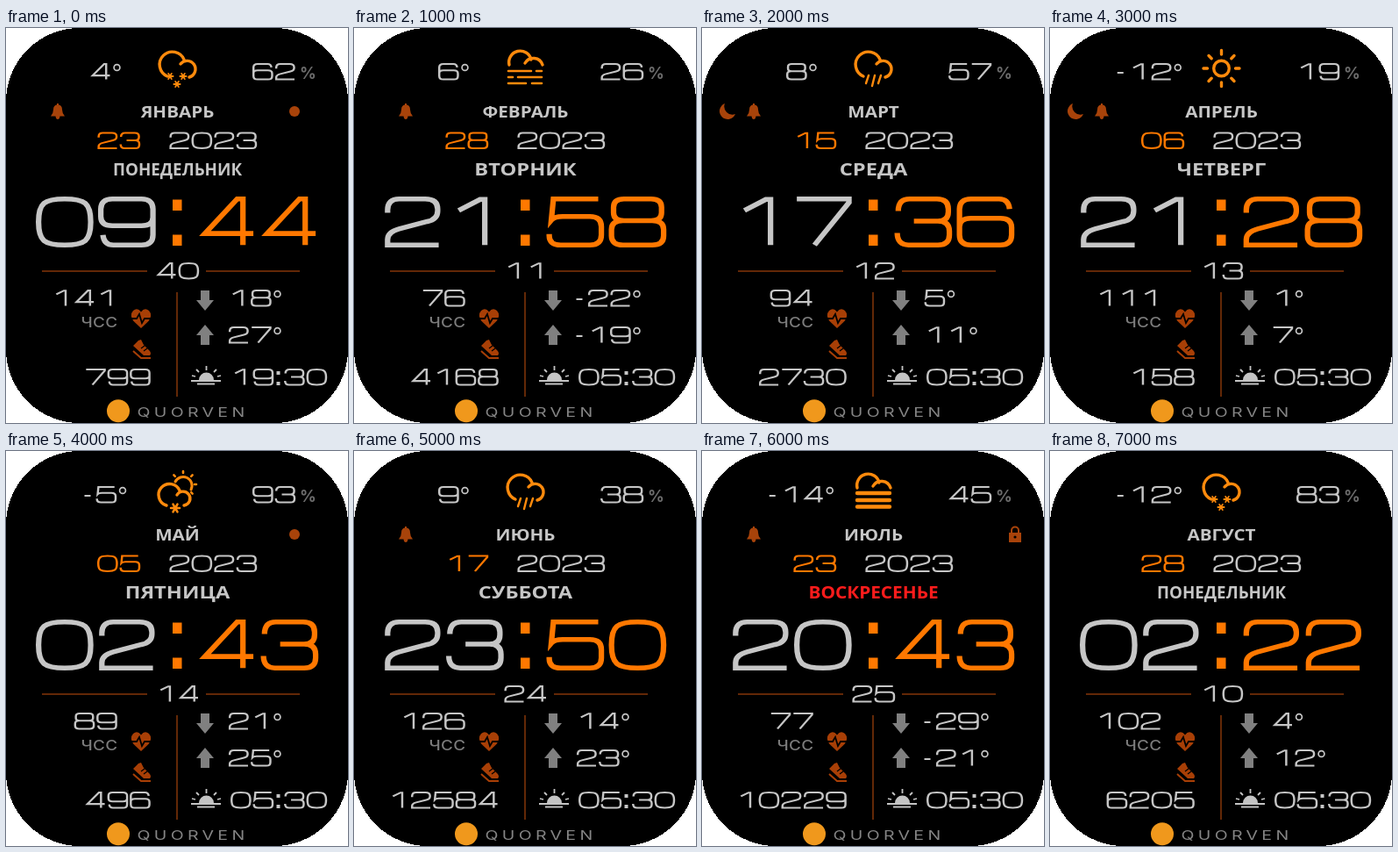
Animation of 390 by 450 pixels, one loop 8000 ms. Source, as an HTML page:

```html
<!DOCTYPE html>
<html lang="ru">
<head>
<meta charset="utf-8">
<style>
  html, body { margin: 0; width: 100%; height: 100%; overflow: hidden; background: #fff; }
  svg { display: block; }
  .line { fill: none; }
  .label { font-family: "Open Sans", sans-serif; font-weight: 700; text-anchor: middle; }
  .plain { font-family: Inter, sans-serif; }
</style>
</head>
<body>
<svg width="390" height="450" viewBox="0 0 390 450">
  <rect width="390" height="450" rx="84" shape-rendering="crispEdges"/>
  <g class="line" stroke="#632807" stroke-width="2">
    <path d="M41 277H161M228 277H335M195 301V420"/>
  </g>
  <path d="M190 195.500h10.500v12.500h-10.500zM190 235.500h10.500v12.500h-10.500z" fill="#ff7800"/>
  <g fill="#a83f06">
    <path d="M154 342L145.500 334Q140.500 327 145 322Q150 318 154 323.500Q158 318 163 322Q167.500 327 162.500 334Z"/>
    <path class="line" d="M142 331H149L152 326L155 336L158 331H166" stroke="#000" stroke-width="1.8"/>
    <path d="M145 362L151 356L154 355L157 361L164 368Q166 371 164 373H157Z"/>
    <path class="line" d="M145 368L154 376H165" stroke="#a83f06" stroke-width="2"/>
    <path class="line" d="M154 365l4 -3M157 368l4 -3" stroke="#000" stroke-width="1.2"/>
  </g>
  <g fill="#808080">
    <path d="M222 299H232V310H237L227 322L217 310H222Z"/>
    <path d="M222 361H232V350H237L227 338L217 350H222Z"/>
  </g>
  <g class="line" stroke="#c4c4c4" stroke-width="1.8">
    <path d="M220 401a8.500 8.500 0 0 1 17 0z" fill="#c4c4c4" stroke="none"/>
    <path d="M211 402H245M218 405.500H238M228.500 385V390M217 389L220 392M240 389L237 392M212 396L216 397M245 396L241 397"/>
  </g>
  <g class="plain">
    <text x="335" y="58" font-size="18.500" font-weight="700" fill="#6c6c6c">%</text>
    <text transform="translate(85.500 340.500) scale(1.18 1)" font-size="16" font-weight="500" letter-spacing=".3" fill="#7c7c7c">ЧСС</text>
    <text transform="translate(149.500 442.500) scale(1.35 1)" font-size="14.500" letter-spacing="3.200" fill="#858585">QUORVEN</text>
  </g>
  <circle cx="128" cy="436.300" r="13" fill="#f0981c"/>
  <g id="face"></g>
</svg>
<script>
const LIGHT = '#c6c6c6', ORANGE = '#ff7800', DIM = '#a8430a', WEATHER = '#ff8a0c';
const SMALL = { w: 23.7, h: 19.5, pitch: 25.5, stroke: 11.5 };
const BIG = { w: 65.7, h: 58, pitch: 71, stroke: 10.5 };

// Centre lines of the digits in a 100 x 100 box
const DIGITS = [
  'M50 0C89 0 100 9 100 50S89 100 50 100S0 91 0 50S11 0 50 0Z',
  'M19 25L60 1H69V100',
  'M2 30V24Q2 0 24 0H74Q98 0 98 22V26Q98 44 78 49L24 65Q2 72 2 88V100H100',
  'M2 26Q2 0 24 0H76Q98 0 98 22V28Q98 48 78 48H32M78 48Q100 48 100 70V78Q100 100 78 100H22Q0 100 0 74',
  'M80 100V0H69L7 75H100',
  'M94 0H8L4 46Q10 38 26 38H78Q100 38 100 60V78Q100 100 78 100H22Q0 100 0 80V76',
  'M96 22Q94 0 76 0H22Q0 0 0 22V78Q0 100 22 100H78Q100 100 100 78V62Q100 42 78 42H22Q0 42 0 60',
  'M0 0H100V8L34 100',
  'M24 0H76Q96 0 96 18V30Q96 47 76 47H24Q4 47 4 30V18Q4 0 24 0ZM22 47H78Q100 47 100 66V80Q100 100 78 100H22Q0 100 0 80V66Q0 47 22 47Z',
  'M4 78Q6 100 24 100H78Q100 100 100 78V22Q100 0 78 0H22Q0 0 0 22V38Q0 58 22 58H78Q100 58 100 40'
];

const ICONS = {
  bell: `<path fill="${DIM}" d="M51 100.500Q54 97 54 93Q54 88 58 87.500V86H60V87.500Q64 88 64 93Q64 97 67 100.500H61.500Q61 104 59 104Q57 104 56.500 100.500Z"/>`,
  moon: `<path fill="${DIM}" d="M26 86A9.300 9.300 0 1 0 38 98A9.300 9.300 0 0 1 26 86Z"/>`,
  link: `<circle fill="${DIM}" cx="329" cy="95" r="6"/>`,
  lock: `<path fill="${DIM}" d="M350 93H364V104H350Z"/>
    <path class="line" stroke="${DIM}" stroke-width="2" d="M353 94V90.500A4 4 0 0 1 361 90.500V94"/>
    <circle cx="357" cy="98" r="1.600"/>`
};

const rays = (cx, cy, inner, outer, count = 8, from = 0, to = count) => {
  let d = '';
  for (let i = from; i < to; i++) {
    const angle = i * 2 * Math.PI / count, c = Math.cos(angle), s = Math.sin(angle);
    d += `M${cx + inner * c} ${cy + inner * s}L${cx + outer * c} ${cy + outer * s}`;
  }
  return d;
};
const stroke = (d, width = 3.4) =>
  `<path class="line" stroke="${WEATHER}" stroke-width="${width}" stroke-linecap="round" d="${d}"/>`;
const flake = (x, y, r = 3.6) => stroke(rays(x, y, 0, r, 6), r / 2);

const CLOUD = stroke('M184 55A14.500 14.500 0 1 1 203 36M199 41A9.500 9.500 0 1 1 209 56');
const LOW_CLOUD = stroke('M177 42A12.500 12.500 0 0 1 202 36M195 40A11 11 0 0 1 215 42');
const WEATHERS = {
  snow: CLOUD + flake(187, 55) + flake(202, 55) + flake(195, 64),
  rain: CLOUD + stroke('M190 54L187 63M197 54L194 66M204 54L201 63', 2.4),
  mist: LOW_CLOUD + stroke('M176 49H202M208 49H214M176 56H181M187 56H214M176 63H196M203 63H214', 2.6),
  fog: LOW_CLOUD + stroke('M177 48H214M177 56H214M177 63.500H214', 4.4),
  sun: `<circle class="line" cx="195.500" cy="46" r="8.800" stroke="${WEATHER}" stroke-width="3.400"/>` +
    stroke(rays(195.5, 46, 16, 20.5)),
  sunSnow: stroke('M183 62A12.500 12.500 0 1 1 198 45M195 50A8 8 0 1 1 203 62') +
    stroke('M193 35A9.500 9.500 0 1 1 211 44', 3) + stroke(rays(202, 38, 13, 15, 8, -3, 2), 2.6) + flake(193, 65, 5)
};

const FIELDS = ['weather', 'temp', 'humidity', 'month', 'date', 'day', 'hour', 'minute',
  'second', 'pulse', 'steps', 'low', 'high', 'sun', 'icons'];
const STATES = [
  'snow,4°,62,ЯНВАРЬ,23,ПОНЕДЕЛЬНИК,09,44,40,141,799,18°,27°,19:30,bell link',
  'mist,6°,26,ФЕВРАЛЬ,28,ВТОРНИК,21,58,11,76,4168,-22°,-19°,05:30,bell',
  'rain,8°,57,МАРТ,15,СРЕДА,17,36,12,94,2730,5°,11°,05:30,moon bell',
  'sun,-12°,19,АПРЕЛЬ,06,ЧЕТВЕРГ,21,28,13,111,158,1°,7°,05:30,moon bell',
  'sunSnow,-5°,93,МАЙ,05,ПЯТНИЦА,02,43,14,89,496,21°,25°,05:30,link',
  'rain,9°,38,ИЮНЬ,17,СУББОТА,23,50,24,126,12584,14°,23°,05:30,bell',
  'fog,-14°,45,ИЮЛЬ,23,ВОСКРЕСЕНЬЕ,20,43,25,77,10229,-29°,-21°,05:30,bell lock',
  'snow,-12°,83,АВГУСТ,28,ПОНЕДЕЛЬНИК,02,22,10,102,6205,4°,12°,05:30,'
].map(row => Object.fromEntries(row.split(',').map((value, i) => [FIELDS[i], value])));

const advance = (char, size) => ({ '-': 13, ':': 10, '°': 9.5 })[char] || size.pitch;
const width = text => [...text].reduce((sum, char) => sum + advance(char, SMALL), 0);

function number(text, x, y, color = LIGHT, size = SMALL) {
  const { w, h, pitch, stroke: pen } = size;
  const scaleX = w / (100 + pen), scaleY = h / (100 + pen);
  let out = '';
  for (const char of text) {
    if (char === '-') out += `<path d="M${x} ${y + 10}h7v2h-7z" fill="${color}" stroke="none"/>`;
    else if (char === ':') out += `<path d="M${x + 1.5} ${y + 3}h4v4h-4zm0 12h4v4h-4z" fill="${color}" stroke="none"/>`;
    else if (char === '°') out += `<circle cx="${x + 5}" cy="${y + 5}" r="3.400" stroke-width="1.700"/>`;
    else out += `<path d="${DIGITS[char]}"
      transform="translate(${x} ${y}) scale(${scaleX} ${scaleY}) translate(${pen / 2} ${pen / 2})"/>`;
    x += advance(char, size);
  }
  return `<g fill="none" stroke="${color}" stroke-width="${pen}">${out}</g>`;
}

const numberEndingAt = (text, right, y) => number(text, right - width(text) + 1.6, y);
const label = (text, y, size, stretch, color) =>
  `<text class="label" font-size="${size}" fill="${color}" transform="translate(195.500 ${y}) scale(${stretch} 1)">${text}</text>`;

function weekday(name) {
  if (name === 'ВОСКРЕСЕНЬЕ') return label(name, 168, 20, 1.04, '#ff1c1c');
  return label(name, 168, 18.8, name.length > 7 ? 1 : 1.26, LIGHT);
}

const render = s =>
  WEATHERS[s.weather] +
  number(s.temp, 113.5 - width(s.temp) / 2, 40) +
  number(s.humidity, 281, 40) +
  s.icons.split(' ').map(name => ICONS[name] || '').join('') +
  label(s.month, 102, 17.5, 1.18, LIGHT) +
  number(s.date, 104, 118.5, ORANGE) +
  number('2023', 186, 118.5) +
  weekday(s.day) +
  number(s.hour, 34, 192, LIGHT, BIG) +
  number(s.minute, 219.5, 192, ORANGE, BIG) +
  number(s.second, 171, 267) +
  numberEndingAt(s.pulse, 127, 298) +
  numberEndingAt(s.steps, 165, 388) +
  number(s.low, 253.5, 298) +
  number(s.high, 253.5, 340) +
  number(s.sun, 256, 388);

const face = document.getElementById('face');
let shown = -1;
function tick() {
  const index = Math.floor(performance.now() / 1000) % STATES.length;
  if (index !== shown) face.innerHTML = render(STATES[shown = index]);
  requestAnimationFrame(tick);
}
tick();
</script>
</body>
</html>
```
